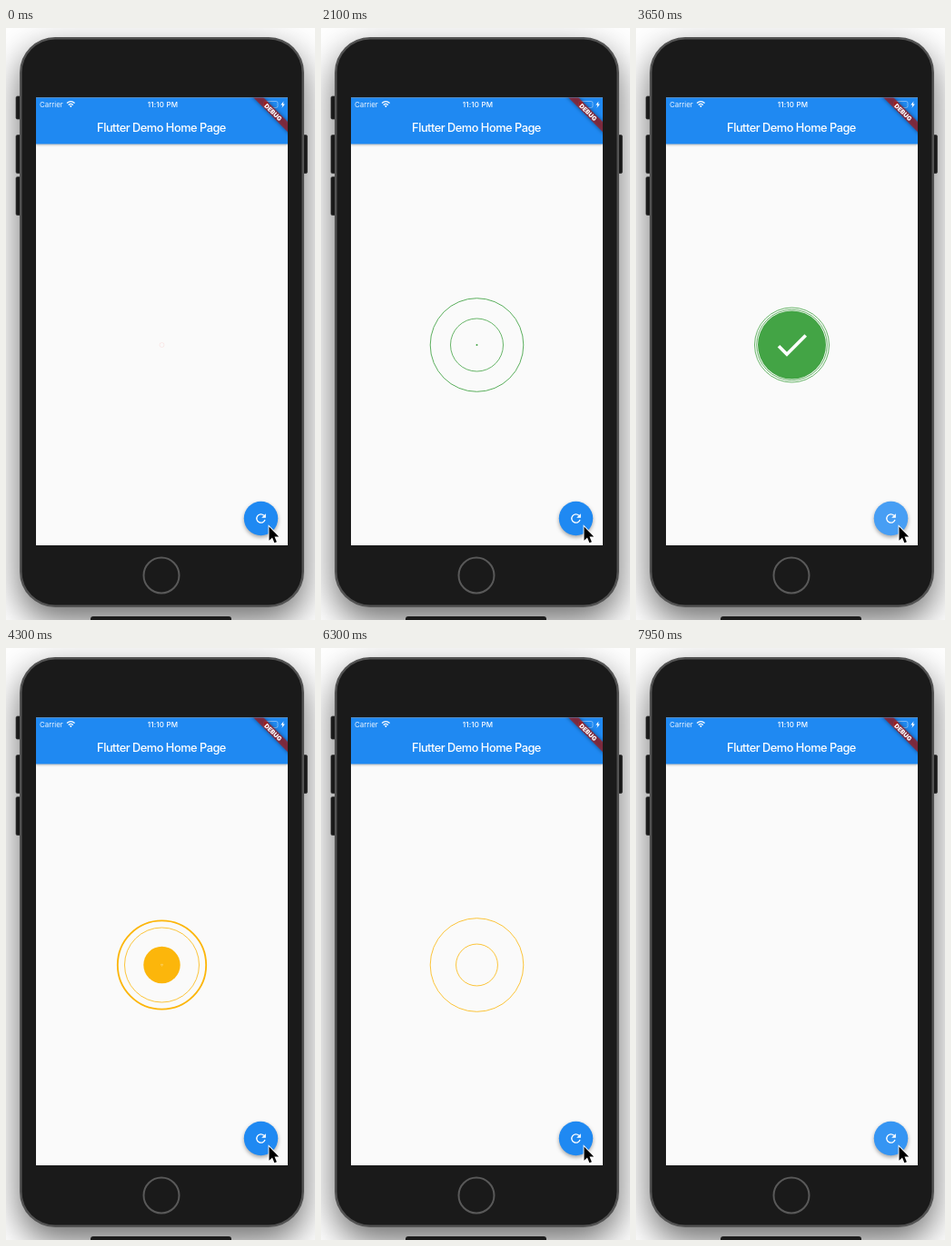
Animation, 340 px wide and 650 px high, one loop 8 s. Source, as an HTML page:

```html
<!DOCTYPE html>
<html lang="en">
<head>
<meta charset="utf-8">
<title>Status animation</title>
<style>
  html, body { margin: 0; width: 100%; height: 100%; overflow: hidden; background: #fff; }
  svg { display: block; width: 340px; height: 650px; }
  text { font-family: Inter, "Open Sans", sans-serif; fill: #fff; }
  .body { filter: drop-shadow(0 15px 19px rgba(0, 0, 0, .58)); }
  .bar { filter: drop-shadow(0 1px 1.2px rgba(0, 0, 0, .28)); }
  .fab { filter: drop-shadow(0 2.3px 2.3px rgba(0, 0, 0, .35)); }
  .ribbon { filter: drop-shadow(0 0 2px rgba(0, 0, 0, .6)); }
  .line { fill: none; stroke: #fff; stroke-width: 2; }
</style>
</head>
<body>
<svg viewBox="0 0 340 650">
  <defs>
    <clipPath id="screen"><rect x="33" y="76.500" width="277" height="491.500"/></clipPath>
  </defs>

  <g fill="#242424" stroke="#444" stroke-width=".7">
    <rect x="11" y="75" width="7" height="25" rx="1.5"/>
    <rect x="11" y="117.500" width="7" height="42" rx="1.5"/>
    <rect x="11" y="163.500" width="7" height="42" rx="1.5"/>
    <rect x="325" y="117.500" width="6.500" height="42" rx="1.5"/>
  </g>
  <rect class="body" x="15" y="10" width="313" height="626" rx="39" fill="#525252"/>
  <rect x="17.500" y="12.500" width="308" height="621" rx="36.500" fill="#1a1a1a"/>
  <circle cx="171" cy="601" r="19.500" fill="none" stroke="#595959" stroke-width="2"/>
  <path d="M93 650v-1q0-3 3-3h149q3 0 3 3v1z" fill="#1c1c1c"/>

  <g clip-path="url(#screen)">
    <rect x="33" y="76" width="277" height="492" fill="#fafafa"/>
    <rect class="bar" x="33" y="70" width="277" height="57.400" fill="#1f89f2"/>
    <text x="37" y="87" font-size="7.900" fill-opacity=".92">Carrier</text>
    <g class="line" style="stroke-width:1.3">
      <path d="M67 82.500q4.300-3.600 8.600 0M68.700 84.400q2.600-2.100 5.200 0"/>
      <path d="M69.900 85.500q1.400-1.100 2.800 0l-1.400 1.700z" fill="#fff" stroke="none"/>
    </g>
    <text x="172.500" y="87" font-size="8" font-weight="500" letter-spacing=".2" text-anchor="middle">11:10 PM</text>
    <text x="171" y="114" font-size="12.800" font-weight="500" letter-spacing="-.49" text-anchor="middle">Flutter Demo Home Page</text>
    <rect x="283.500" y="80.500" width="15.500" height="7" rx="1.800" fill="none" stroke="#fff" stroke-opacity=".5" stroke-width=".8"/>
    <rect x="284" y="81.200" width="4" height="5.600" rx="1" fill="#ff3030"/>
    <path d="M305.500 80.500l-3.200 4h2l-.8 3.200 3.400-4.200h-2z" fill="#fff"/>
    <g transform="translate(310 76.500) rotate(45) translate(0 22.700)">
      <rect class="ribbon" x="-40" y="-4" width="80" height="8" fill="#a01c20" fill-opacity=".74"/>
      <text y="2.500" font-size="6.800" font-weight="900" text-anchor="middle">DEBUG</text>
    </g>

    <g id="status" transform="translate(171.500 348)">
      <circle id="outer" fill="none"/>
      <circle id="inner" fill="none" stroke-width=".8"/>
      <circle id="disc"/>
      <path id="icon" class="line"/>
    </g>

    <g transform="translate(280.500 538.500)">
      <circle class="fab" r="18.700" fill="#1f89f2"/>
      <circle id="press" r="18.700" fill="#fff"/>
      <g transform="scale(.669) translate(-12 -12)">
        <path class="line" d="M18.700 14A7 7 0 1 1 16.950 7.050"/>
        <path d="M13 11h7V4z" fill="#fff"/>
      </g>
    </g>
    <path d="M289.500 547.500v15.200l3.500-3.300 2.400 5.800 2.500-1-2.400-5.700h4.700z" stroke="#fff" stroke-width="1.800" paint-order="stroke"/>
  </g>
</svg>

<script>
const LOOP = 8000;
const RED = { color: '#f23a2d', icon: 'M5.7 5.7 18.3 18.3M18.3 5.7 5.7 18.3' };
const GREEN = { color: '#43a445', icon: 'M4.1 12.7 9 17.6 20.3 6.3' };
const AMBER = { color: '#fcb60b', icon: 'M12 5a8 8 0 1 0 .01 0zM2.6 6.5l4.6-3.9M21.4 6.5l-4.6-3.9M11.8 8v5.5l4.4 2.6' };

const runs = [
  { start: -60, ...RED },
  { start: 1690, ...GREEN },
  { start: 3680, ...AMBER },
  { start: 5930, ...AMBER },
  { start: 7920, ...RED },
];

const ramp = (t, from, to) => Math.min(1, Math.max(0, (t - from) / (to - from)));
const smooth = x => x * x * (3 - 2 * x);
const easeOut = x => 1 - (1 - x) ** 2;
const bump = x => Math.sin(Math.PI * x);

function set(id, attrs) {
  const node = document.getElementById(id);
  for (const name in attrs) node.setAttribute(name, attrs[name]);
}

function draw(time) {
  const { start, color, icon } = runs.filter(run => run.start <= time).pop();
  const t = time - start;
  const shrink = ramp(t, 400, 1150);
  const iconSize = 44 * easeOut(ramp(t, 600, 1270));
  // The button lights up just before a run begins and fades right after.
  const glow = runs.reduce((sum, run) => sum + bump(ramp(time - run.start, -100, 60)), 0);

  set('status', { opacity: ramp(t, 50, 150) });
  set('outer', {
    r: 51.3 * ramp(t, 45, 370) - 12.5 * smooth(shrink),
    stroke: color,
    'stroke-width': 0.8 + 1.3 * bump(shrink),
  });
  set('inner', { r: 41 * ramp(t, 220, 490), stroke: color });
  set('disc', { r: 37.5 * ramp(t, 400, 810), fill: color });
  set('icon', { d: icon, transform: `scale(${iconSize / 24}) translate(-12 -12)` });
  set('press', { opacity: 0.18 * glow });
}

const begin = performance.now();
function tick() {
  draw((performance.now() - begin) % LOOP);
  requestAnimationFrame(tick);
}
tick();
</script>
</body>
</html>
```
